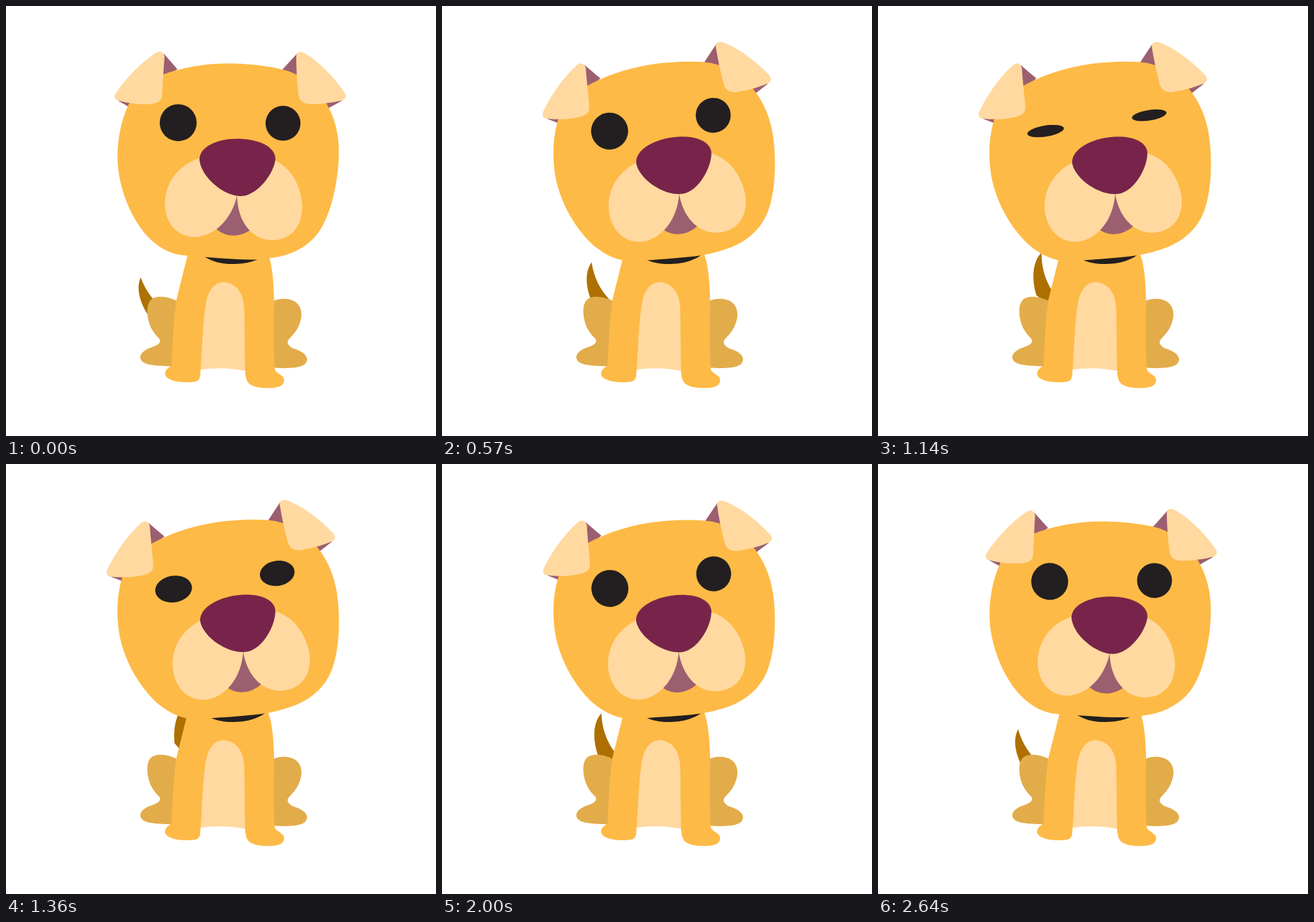
Recreate the animation shown at these times as an HTML page. Size 640 by 640 pixels, loop 2.71 s.

```html
<!DOCTYPE html>
<html lang="en">
<head>
<meta charset="utf-8">
<title>Puppy</title>
<style>
  html, body { margin: 0; width: 100%; height: 100%; overflow: hidden; background: #fff; }
  svg { display: block; width: 100%; height: 100%; }
  .coat { fill: #feba46; }
  .shade { fill: #e2ac4b; }
  .cream { fill: #ffd9a0; }
  .tail { fill: #ae7000; }
  .plum { fill: #78244a; }
  .mauve { fill: #9c5f70; }
  .ink { fill: #231f20; }
</style>
</head>
<body>
<svg viewBox="0 0 640 640">
  <path id="tail" class="tail" d="M200.5 404C193 420 199 444 216 466L262 480L241 455C222 443 208 425 200.5 404Z"/>

  <g class="shade">
    <path d="M254 439C240 432 228 432 221 434C211 437 209 450 211 463C214 480 221 488 228 495C231 499 229 503 222 506C210 510 199 515 200 524C202 534 218 536 250 536Z"/>
    <path d="M396 440C405 435 415 435 423 437C436 440 442 452 439 466C435 483 427 489 421 496C417 501 420 505 426 509C438 513 449 518 448 527C446 538 430 540 398 538.5Z"/>
  </g>

  <path class="cream" d="M288 541.5Q322 536 358 543.5L358 405L296 405Z"/>
  <path class="coat" d="M276 345L271 368C264 396 258 420 253.5 438C249 470 248 500 246.5 535C238 540 236 545 237 549C240 558 258 560 272 560C283 559.5 288 559 289 550C292 515 292 480 297 445C301 420 312 411 325 411C345 413 354 430 354.5 450C355.5 490 355 520 356 545C357 561 362 567 385 568.5C406 569 413 566 414 557C414 549 403 548 400 541C398 510 399 470 399 435C398 405 396 386 391 372L385 345Z"/>
  <path class="ink" d="M278 360C298 378 315 384 336 384C358 384 377 380 394 364Z"/>

  <g id="head">
    <g class="mauve">
      <path d="M235 71L255 94L234 108L186 152L167 141Z"/>
      <path d="M433 71L411 95L433 106L480 152L500 141Z"/>
    </g>
    <path class="coat" d="M330 85.500C366 85.500 402 91 422 97.500C470 116 496 165 495.500 218C495 258 485 305 469 331C453 357.500 424 372.500 391 375.500C362 381 310 374 268 371.500C243 370 224 358 206.500 338.500C181 307 166 263 166 224C166.500 181 179 146 197 122.500C216 104 272 85.500 330 85.500Z"/>
    <g class="cream">
      <path d="M236 75C234 66 227 66 221 71C200 85 178 108 163 130C160 136 162 140 168 141C183 145 198 147 214 146C226 145 231 142 232 134C234 114 234 95 236 75Z"/>
      <path d="M432 74C433 68 438 67 444 70C466 82 490 108 504 129C508 136 504 140 498 141C482 145 464 146 452 146C441 145 436 140 435 131C433 112 432 93 432 74Z"/>
    </g>
    <path class="mauve" d="M344 280L306 322C318 346 350 348 370 328Z"/>
    <g class="cream">
      <path d="M290 226C256 236 236 264 236.500 296C238 326 256 344 282 344C309 342 335 320 344 282L330 240Z"/>
      <path d="M344 282C344 318 364 348.500 397 348.500C426 348 441 326 441 298C439 266 424 240 398 229L350 240Z"/>
    </g>
    <path class="plum" d="M288 229C287 211 312 197.500 345 197.500C378 198 400 210 401 227C400 248 374 283 349 283C322 282.500 290 253 288 229Z"/>
    <ellipse class="ink eye" cx="256.300" cy="173.700" rx="27.500" ry="27.500"/>
    <ellipse class="ink eye" cx="412.300" cy="174.600" rx="26" ry="26"/>
  </g>
</svg>
<script>
  const LOOP = 2710, FPS = 14;
  const WAG = 7.5, PEAK = 2.5, SWING = 46;
  const head = document.getElementById('head');
  const tail = document.getElementById('tail');
  const eyes = [...document.querySelectorAll('.eye')];

  const ramp = (n, from, to) => Math.min(1, Math.max(0, (n - from) / (to - from)));

  // Lean over quickly, hold, come back slowly
  const tilt = n => -9 * (ramp(n, 0, 6.4) - ramp(n, 27.2, 38));

  // One slow blink while the head is held
  const lids = n => 1 - 0.84 * Math.min(ramp(n, 9, 15), 1 - ramp(n, 15, 21));

  // Quick flick up, slower fall
  function wag(n) {
    const p = n % WAG;
    return SWING * Math.min(ramp(p, 0, PEAK) ** 0.85, 1 - ramp(p, PEAK, WAG));
  }

  // The picture advances in whole steps, on a 10 ms clock
  const stepAt = ms => Math.floor((Math.floor(ms / 10) * 10 + 5) * FPS / 1000);

  function draw(ms) {
    const n = stepAt(ms % LOOP);
    head.setAttribute('transform', `rotate(${tilt(n)} 332 223.4)`);
    tail.setAttribute('transform', `rotate(${wag(n)} 321 501)`);
    for (const eye of eyes) eye.setAttribute('ry', eye.getAttribute('rx') * lids(n));
  }

  let start;
  function tick(now) {
    start ??= now;
    draw(Math.max(0, now - start));
    requestAnimationFrame(tick);
  }
  draw(0);
  requestAnimationFrame(tick);
</script>
</body>
</html>
```
